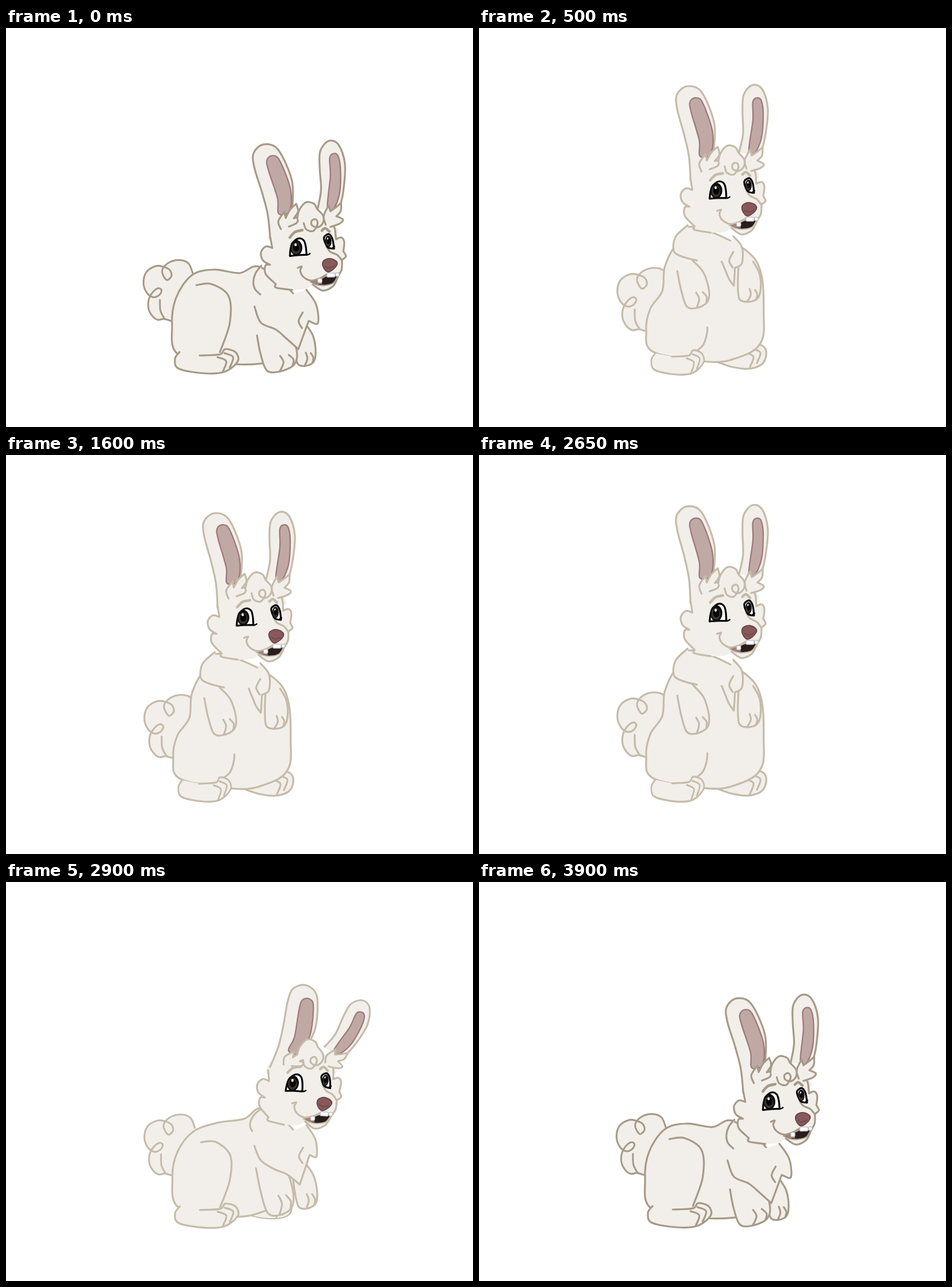
Write an HTML page with a canvas that moves like this. It is 810x692 px and loops after 4.95 s.

```html
<!DOCTYPE html>
<html lang="en">
<head>
<meta charset="utf-8">
<title>Rabbit</title>
<style>
html, body { margin: 0; width: 100%; height: 100%; overflow: hidden; background: #fff; }
canvas { display: block; }
</style>
</head>
<body>
<canvas id="stage" width="810" height="692"></canvas>
<script>
const ctx = document.getElementById('stage').getContext('2d');
const FUR = '#f2efea', LIGHT = '#c4bba9', DARK = '#a59a86', INK = '#050404';
const GROUND = 600;

// "x,y x,y!" : points of a smooth curve, "!" marks a corner
const pts = s => s.match(/\S+/g).map(w => {
  const [x, y] = w.split(',').map(parseFloat);
  return { x, y, cusp: w.endsWith('!') };
});

// head: shift x, y, turn; ears: turn, left length, right length
// tail, foot, farFoot: shift x, y, scale x, y; arms: shoulder, hand, half width
const poses = {
  crouch: {
    head: [93, 97, -.035], ears: [0, 1, 1], tail: [-4, -18, .95, .96],
    foot: [0, 0, 1, 1], farFoot: [30, -8, .8, .5],
    arm: [460, 515, 478, 595, 33], farArm: [514, 515, 520, 586, 19],
    torso: pts('442,415 405,425 360,419 322,429 295,468 288,515 300,567 395,583 455,581 510,575 520,540 505,470'),
    thigh: pts('330,446 356,444 386,465 388,512 371,562'),
    ruff: pts('443,412 433,425 429,440 432,453 441,462'),
    bib: pts('431,483 442,511 468,523 488,540 507,557! 525,508! 541,512 538,480 521,454')
  },
  leap: {
    head: [76, 56, .12], ears: [.57, .93, .8], tail: [-2, -17, .98, .97],
    foot: [0, 1, 1, 1], farFoot: [-12, -6, 1, .7],
    arm: [450, 455, 476, 568, 27], farArm: [510, 475, 524, 556, 21],
    torso: pts('445,380 415,402 370,415 325,433 297,467 288,510 301,565 395,579 440,567 480,535 502,500 500,420'),
    thigh: pts('341,453 366,453 389,478 387,520 371,565'),
    ruff: pts('445,379 430,388 420,399 417,408 418,416'),
    bib: pts('429,444 440,467 461,484 486,490 510,508! 526,455! 536,457 534,428 519,404')
  },
  stand: {
    head: [0, 0, 0], ears: [0, 1, 1], tail: [0, 0, 1, 1],
    foot: [6, 2, .83, 1], farFoot: [0, 0, 1, 1],
    arm: [362, 405, 380, 485, 25], farArm: [468, 405, 467, 475, 21],
    torso: pts('372,345 340,378 322,415 318,456 297,487 290,525 303,562 400,579 448,572 486,550 494,505 478,400'),
    thigh: pts('396,519 396,524 394,536 387,552 366,568'),
    ruff: pts('362,342 341,362 338,387 354,397 378,403'),
    bib: pts('421,405 425,415 428,422 434,436 442,447! 444,416! 456,408 456,380 441,361')
  },
  lean: {
    head: [75, 27, .09], ears: [.22, 1, .94], tail: [-1, 1, 1, 1],
    foot: [-1, -1, 1, 1], farFoot: [-4, -6, .97, 1],
    arm: [435, 440, 460, 528, 25], farArm: [508, 455, 512, 520, 20],
    torso: pts('447,355 415,398 370,422 326,446 297,486 291,522 301,562 395,579 425,571 456,553 479,522 500,430'),
    thigh: pts('390,479 390,495 388,518 382,541 370,564'),
    ruff: pts('438,362 429,373 422,387 419,399 418,412'),
    bib: pts('437,433 456,441 470,451 484,464 496,478! 516,444! 529,449 530,410 516,386')
  }
};

// time, pose, stretch, skew, eye opening
const keys = [
  [0, 'crouch', 1, 0, 1], [150, 'leap', .95, .08, .3], [200, 'leap', 1, 0, 0],
  [300, 'lean', 1, 0, .4], [400, 'stand', 1.02, 0, 1], [500, 'stand', 1, 0, 1],
  [1200, 'stand', 1, 0, 1], [1400, 'stand', 1, 0, 0], [1600, 'stand', 1, 0, 1],
  [2600, 'stand', 1, 0, 1], [2650, 'stand', 1.024, 0, 1], [2750, 'lean', 1, 0, 1],
  [2850, 'leap', 1, .012, 1], [3000, 'crouch', .985, 0, 1], [3050, 'crouch', 1, 0, 1],
  [3600, 'crouch', 1, 0, 1], [3750, 'crouch', 1, 0, 0], [3900, 'crouch', 1, 0, 1],
  [4950, 'crouch', 1, 0, 1]
];

const tail = pts('330,440 322,422 304,416 284,422 274,436 282,452 291,445 288,434 276,428 262,427 245,438 240,458 246,475 257,483 268,480 273,471 267,467 257,474 250,486 249,503 256,517 266,524 277,522! 290,526');
const tailFold = pts('270,488 271,508 279,523');
const foot = pts('301,562 293,574 300,591 345,599 380,596 402,578 398,562 380,557 371,566 336,568');
const farFoot = pts('415,580 440,588 466,591 488,585 497,573 497,557 485,549 465,556 435,570');
const limb = pts('-.85,.15 -.88,.55 -.75,.92 -.1,1 .7,.93 1,.7 .9,.3 .35,0');
const fingers = [pts('.1,.68 .2,.83 -.1,1'), pts('.55,.7 .75,.82 .62,.94')];

const skull = pts('370,270 380,235 410,222 450,222 475,240 478,262');
const face = pts('367,262 370,281! 359,278 350,288 353,302 365,310! 357,311 357,326 374,344! 374,350 402,355! 425,354 438,347! 455,358 473,351 482,335! 489,322 490,306! 497,300 493,291! 495,275 490,267 481,270! 479,250 470,238');
const hair = pts('415,232 419,217 431,204 445,207 450,216 460,228 459,241 450,248 440,244 440,236 447,234 450,242 442,254 430,251 426,240');
const ears = [
  { pivot: [469, 245],
    outer: pts('451,216 458,183 457,145 459,116 474,99 491,106 501,140 496,190 487,222'),
    inner: pts('483,121 475,128 475,160 468,214 479,216 490,190 493,150 490,127'),
    tuft: pts('464,244 461,229 470,211! 473,221! 482,215 492,207! 491,221 483,230! 494,236 488,243 472,248') },
  { pivot: [388, 268],
    outer: pts('367,264 364,222 355,182 344,142 343,116 361,101 386,111 408,165 407,214'),
    inner: pts('376,121 366,128 368,146 382,195 383,222 402,218 405,180 388,130'),
    tuft: pts('386,249 382,235 393,219! 395,230! 403,216 414,206! 417,219 409,231! 416,230 414,239 400,245') }
];
const eyes = [
  { shape: pts('400,296! 402,282 408,271 417,266 425,270 428,280 429,295! 414,295'),
    lash: pts('428,294 431,295 435,293'), lid: pts('399,288 412,296 429,297'),
    brow: pts('401,264 410,255 423,252'), iris: [411.5, 282, 10.5, 13.5], base: 295 },
  { shape: pts('460,268 464,262 470,261 475,270 477,286! 466,283'),
    lash: pts('475,284 478,282'), lid: pts('462,283 469,287 476,284'),
    brow: pts('457,254 463,250 470,256'), iris: [467.5, 273, 5.5, 10], base: 285 }
];
const smile = pts('413,317 420,315 417,322 422,333 436,340 452,336 463,330');
const bridge = pts('464,282 470,291 482,297 490,307');
const mouth = pts('434,342! 448,339 462,333 484,329! 474,345 458,349 444,347');
const tongue = pts('436,342! 448,340 455,347! 444,346');
const nose = pts('456,311 460,305 470,303 480,308 481,314 474,322 465,326 458,319');
const nostril = pts('460,316 467,319 476,316');

const lerp = (a, b, f) =>
  typeof a === 'number' ? a + (b - a) * f :
  Array.isArray(a) ? a.map((v, i) => lerp(v, b[i], f)) :
  typeof a === 'object' ? Object.fromEntries(Object.keys(a).map(k => [k, lerp(a[k], b[k], f)])) : a;

let outline = LIGHT;

function paint(p, { fill, line = outline, width = 3.2, closed = false } = {}) {
  const n = p.length;
  const at = i => closed ? p[(i + n) % n] : p[Math.max(0, Math.min(n - 1, i))];
  ctx.beginPath();
  ctx.moveTo(p[0].x, p[0].y);
  for (let i = 0; i < (closed ? n : n - 1); i++) {
    const a = at(i), b = at(i + 1);
    const o = a.cusp ? a : at(i - 1), q = b.cusp ? b : at(i + 2);
    ctx.bezierCurveTo(a.x + (b.x - o.x) / 6, a.y + (b.y - o.y) / 6,
      b.x - (q.x - a.x) / 6, b.y - (q.y - a.y) / 6, b.x, b.y);
  }
  if (closed) ctx.closePath();
  if (fill) {
    ctx.fillStyle = fill;
    ctx.fill();
  }
  if (line) {
    ctx.strokeStyle = line;
    ctx.lineWidth = width;
    ctx.stroke();
  }
}

const fur = (p, closed) => paint(p, { fill: FUR, closed });

function group(draw, x, y, { dx = 0, dy = 0, turn = 0, sx = 1, sy = 1 }) {
  ctx.save();
  ctx.translate(x + dx, y + dy);
  ctx.rotate(turn);
  ctx.scale(sx, sy);
  ctx.translate(-x, -y);
  draw();
  ctx.restore();
}

const placed = ([dx, dy, sx, sy]) => ({ dx, dy, sx, sy });

function drawLimb([x, y, hx, hy, w]) {
  const dx = hx - x, dy = hy - y, k = w / Math.hypot(dx, dy);
  const along = p => p.map(({ x: v, y: u }) => ({ x: x + dx * u + dy * k * v, y: y + dy * u - dx * k * v }));
  fur(along(limb));
  fingers.forEach(f => paint(along(f)));
}

function drawFoot(shape, x, y) {
  fur(shape);
  for (const [dx, dy] of [[0, 0], [12, -7]]) {
    const toe = pts('-16,-25 -1,-18 -7,0');
    paint(toe.map(p => ({ x: p.x + x + dx, y: p.y + y + dy })));
  }
}

function drawEye({ shape, lash, lid, brow, iris: [x, y, rx, ry], base }, open) {
  group(() => paint(brow, { width: 4.6 }), 0, 0, { dy: 3 * (1 - open) });
  if (open < .2) return paint(lid, { line: INK, width: 3.6 });
  group(() => {
    paint(shape, { fill: '#fff', line: INK, width: 3.2, closed: true });
    const disc = (color, k, dx = 0, dy = 0) => {
      ctx.fillStyle = color;
      ctx.beginPath();
      ctx.ellipse(x + dx, y + dy, rx * k, ry * k, 0, 0, 2 * Math.PI);
      ctx.fill();
    };
    disc('#0c0908', 1);
    disc('#3b342e', .74, -.5, 1);
    disc(INK, .52);
    disc('#fff', .19, -1, -5);
    paint(lash, { line: INK, width: 2.4 });
  }, 0, base, { sy: open });
}

function drawMouth() {
  paint(mouth, { fill: '#281d1b', width: 2.2, closed: true });
  paint(tongue, { fill: '#a5837f', line: null, closed: true });
  ctx.fillStyle = '#fff';
  ctx.strokeStyle = '#c3c3c6';
  ctx.lineWidth = 1.4;
  for (const [x, y, w, h] of [[447, 337, 7, 7], [463, 328, 14, 7], [478, 328, 6, 6]]) {
    ctx.beginPath();
    ctx.roundRect(x, y, w, h, 2);
    ctx.fill();
    ctx.stroke();
  }
}

function drawHead(turns, open) {
  const [turn, ...lengths] = turns;
  paint(skull, { fill: FUR, line: null, closed: true });
  paint(face, { fill: FUR, line: null });
  paint(face.slice(0, 11));
  paint(face.slice(12));
  ears.forEach(({ pivot, outer, inner, tuft }, i) => group(() => {
    fur(outer);
    paint(inner, { fill: '#c0a9a5', line: '#a07a7e', width: 2.4, closed: true });
    fur(tuft);
  }, ...pivot, { turn, sy: lengths[1 - i] }));
  fur(hair);
  paint(smile);
  paint(bridge);
  drawMouth();
  paint(nose, { fill: '#87595b', line: '#6f464a', width: 2, closed: true });
  paint(nostril, { line: '#6f464a', width: 1.6 });
  eyes.forEach(e => drawEye(e, open));
}

function drawRabbit(p, open) {
  group(() => { fur(tail); paint(tailFold); }, 290, 526, placed(p.tail));
  group(() => drawFoot(farFoot, 477, 588), 415, 590, placed(p.farFoot));
  fur(p.torso, true);
  paint(p.thigh);
  group(() => drawFoot(foot, 383, 596), 293, 599, placed(p.foot));
  drawLimb(p.farArm);
  drawLimb(p.arm);
  fur(p.ruff);
  fur(p.bib);
  const x = (p.bib[4].x + p.bib[7].x) / 2, y = (p.bib[4].y + p.bib[7].y) / 2;
  paint([{ x: x - 8, y: y - 25 }, { x: x - 15, y: y - 10 }, { x: x - 9, y: y + 2 }]);
  const [dx, dy, turn] = p.head;
  group(() => drawHead(p.ears, open), 468, 314, { dx, dy, turn });
}

function draw(t) {
  const i = keys.findIndex(k => k[0] > t) - 1;
  const [t0, from, ...u] = keys[i], [t1, to, ...v] = keys[i + 1];
  const f = (t - t0) / (t1 - t0);
  const [stretch, skew, open] = lerp(u, v, f);
  outline = from === 'crouch' && (f === 0 || to === 'crouch') ? DARK : LIGHT;
  ctx.fillStyle = '#fff';
  ctx.fillRect(0, 0, 810, 692);
  ctx.lineCap = ctx.lineJoin = 'round';
  ctx.save();
  ctx.transform(1, 0, -skew, stretch, skew * GROUND, GROUND * (1 - stretch));
  drawRabbit(lerp(poses[from], poses[to], f), open);
  ctx.restore();
}

const start = performance.now();
function tick() {
  const t = (performance.now() - start) % 4950;
  draw(Math.floor(t / 50) * 50);
  requestAnimationFrame(tick);
}
tick();
</script>
</body>
</html>
```
